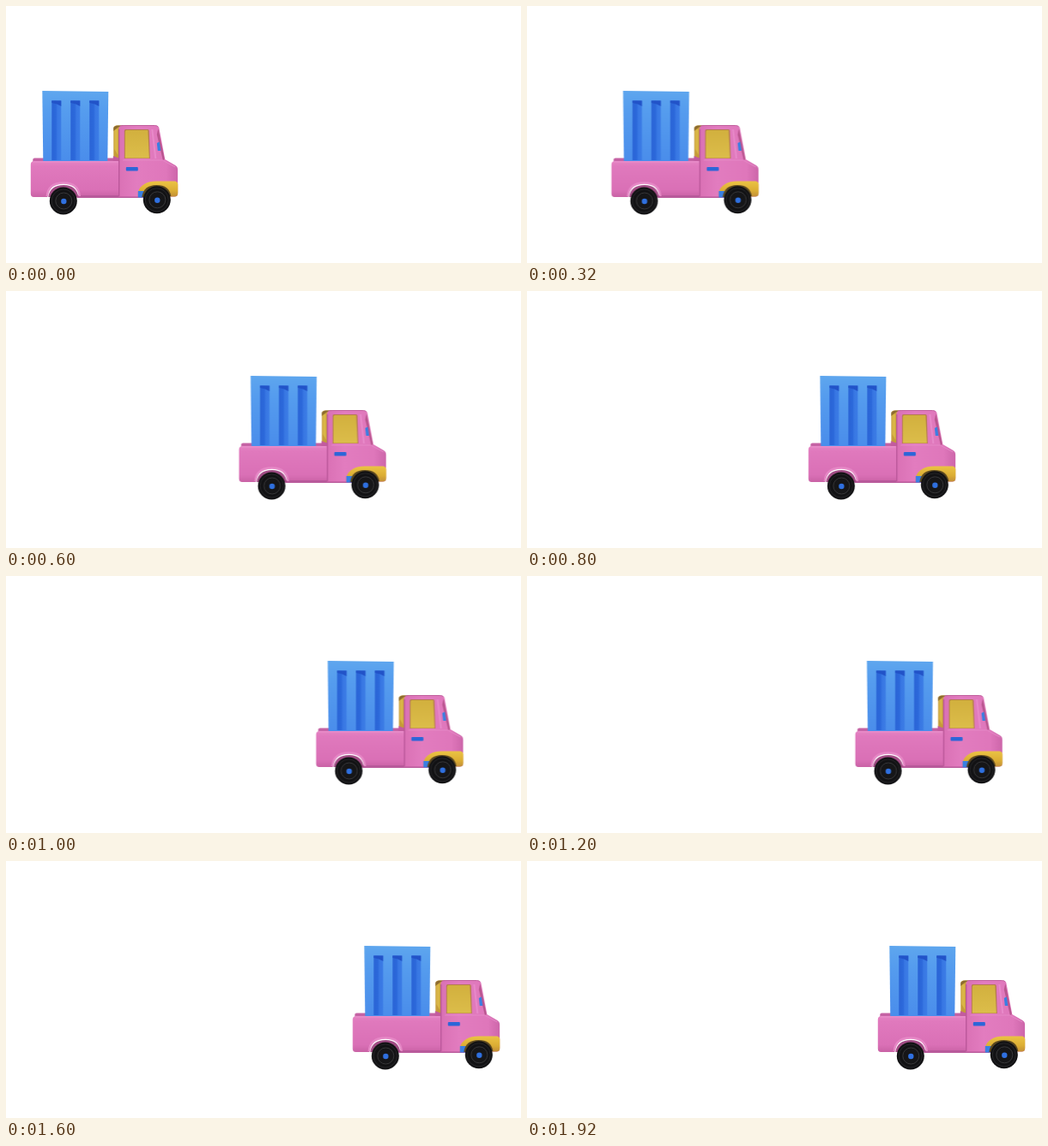
These frames come from a looping animation (600 by 300 pixels, 1960 ms). An HTML page:

```html
<!DOCTYPE html>
<html lang="en">
<head>
<meta charset="utf-8">
<title>Toy truck</title>
<style>
  html, body { margin: 0; width: 100%; height: 100%; overflow: hidden; background: #fff; }
  svg { display: block; width: 600px; height: 300px; }
</style>
</head>
<body>
<svg viewBox="0 0 600 300">
  <defs>
    <linearGradient id="crate" x2="0" y2="1">
      <stop offset="0" stop-color="#5ea6ee"/>
      <stop offset=".3" stop-color="#559cee"/>
      <stop offset="1" stop-color="#4a8deb"/>
    </linearGradient>
    <linearGradient id="groove">
      <stop offset="0" stop-color="#2a64d6"/>
      <stop offset=".45" stop-color="#2c69db"/>
      <stop offset=".6" stop-color="#3877e3"/>
      <stop offset="1" stop-color="#3c7de6"/>
    </linearGradient>
    <linearGradient id="bed" x2="0" y2="1">
      <stop offset="0" stop-color="#e583c3"/>
      <stop offset=".15" stop-color="#e079bd"/>
      <stop offset=".8" stop-color="#da70b6"/>
      <stop offset="1" stop-color="#c962a5"/>
    </linearGradient>
    <linearGradient id="cab">
      <stop offset="0" stop-color="#da71b5"/>
      <stop offset=".3" stop-color="#e27cbf"/>
      <stop offset=".8" stop-color="#df77bb"/>
      <stop offset="1" stop-color="#cd66aa"/>
    </linearGradient>
    <linearGradient id="glass" x2="0" y2="1">
      <stop offset="0" stop-color="#d2b03e"/>
      <stop offset="1" stop-color="#dcbd4a"/>
    </linearGradient>
    <linearGradient id="bumper" x2="0" y2="1">
      <stop offset="0" stop-color="#ebc344"/>
      <stop offset=".6" stop-color="#dcae34"/>
      <stop offset="1" stop-color="#c28f38"/>
    </linearGradient>
    <g id="slot">
      <path d="M0 110.500H11V180H0Z" fill="url(#groove)"/>
      <path d="M0 110.500H11V117L6 114.500 0 113Z" fill="#2253c8"/>
    </g>
    <g id="wheel">
      <circle r="16" fill="#121214"/>
      <circle r="13.500" fill="none" stroke="#252528"/>
      <circle cx=".5" r="9.500" fill="#161618" stroke="#38383a"/>
      <circle cx=".5" cy=".5" r="3.200" fill="#2f70e0"/>
    </g>
  </defs>
  <g id="truck">
    <g transform="translate(-.7 0)">
      <!-- bed back wall and crate -->
      <path d="M32 183V179Q32 177.500 34 177.500H132V183Z" fill="#c562a4"/>
      <path d="M43 99 120 100 119 181.500H44Z" fill="url(#crate)"/>
      <use href="#slot" x="54"/>
      <use href="#slot" x="76"/>
      <use href="#slot" x="98"/>

      <!-- rear window -->
      <path d="M126 181V143.500Q126 140 129 139.500H139V181Z" fill="#c59b38"/>
      <path d="M127 145 131 143V174L127 167Z" fill="#d9b646"/>
      <path d="M126 146V142Q127 140 131 139.500H140V141H132L128 144Z" fill="#8c6b2f"/>
      <path d="M125.500 175 132 177.500V182H125.500Z" fill="#c35b9f"/>

      <!-- bed -->
      <path d="M34 181H133V223H87Q86 208 68 207 50 208 49 223H33Q29.500 223 29.500 219V185Q29.500 181 34 181Z" fill="url(#bed)"/>
      <path d="M32 182H131" stroke="#ea90cc" fill="none"/>
      <path d="M83 221H162V224H83Z" fill="#b95a9b"/>

      <!-- cab -->
      <path d="M132 223V144Q132 139.500 136 139.500H174Q178 139.500 179 142L186 179 198 186Q200.800 187.500 200.800 191V219Q200.800 222.500 197 222.500H132Z" fill="url(#cab)"/>
      <path d="M134 140Q135 139.500 138 139.500H174Q177 139.500 178 141" fill="none" stroke="#c05d9c"/>
      <path d="M138.500 178V146Q138.500 144 140 144H166Q167.300 144 167.500 146L168.500 178Z" fill="#b57a50"/>
      <path d="M139.500 177.500V147Q139.500 145 141 145H166L167.500 177.500Z" fill="url(#glass)"/>
      <path d="M171 144 175 178" stroke="#e88aca" stroke-width="2" fill="none"/>
      <path d="M178 143 185.500 179 183.500 180 176.500 150Z" fill="#b9568f"/>
      <path d="M176.500 160 179.500 158.500 181 169H177.500Z" fill="#397fe2"/>
      <path d="M137 180H183L198 188" fill="none" stroke="#e688c7"/>
      <path d="M132.500 144V222" stroke="#b04e90" fill="none"/>
      <rect x="140.500" y="188" width="14" height="4.500" rx="1" fill="#2c66d8"/>

      <!-- arches and bumper -->
      <path d="M48.500 222Q50 206.500 67.500 206.500 85 206.500 86.500 222" fill="none" stroke="#e688c6" stroke-width="2.500"/>
      <path d="M50 223Q52 209 68 209 83 209 85 223Z" fill="#a04c84"/>
      <path d="M154.500 217Q159 204.500 176 204.500H198Q201 205.500 201 208.500V218Q201 222.500 197 222.500H154.500Z" fill="url(#bumper)"/>
      <path d="M154.500 216H162V223.500H154.500Z" fill="#397fe2"/>
      <path d="M159 223Q161 209 176 209 191 209 193 222Z" fill="#5b4820"/>
      <use href="#wheel" x="67.500" y="227.500"/>
      <use href="#wheel" x="176.500" y="226.300"/>
    </g>
  </g>
</svg>
<script>
  const LOOP = 1960, STEP = 40, TRAVEL = 380;
  const drive = document.getElementById('truck').animate(
    [{ transform: 'translateX(0px)' }, { transform: `translateX(${TRAVEL}px)` }],
    { duration: LOOP, easing: 'cubic-bezier(.33, 0, 0, 1)', fill: 'both' }
  );
  drive.pause();

  const start = performance.now();
  // The truck moves in discrete 40 ms steps
  function tick() {
    const t = (performance.now() - start) % LOOP;
    drive.currentTime = Math.floor(t / STEP) * STEP;
    requestAnimationFrame(tick);
  }
  tick();
</script>
</body>
</html>
```
